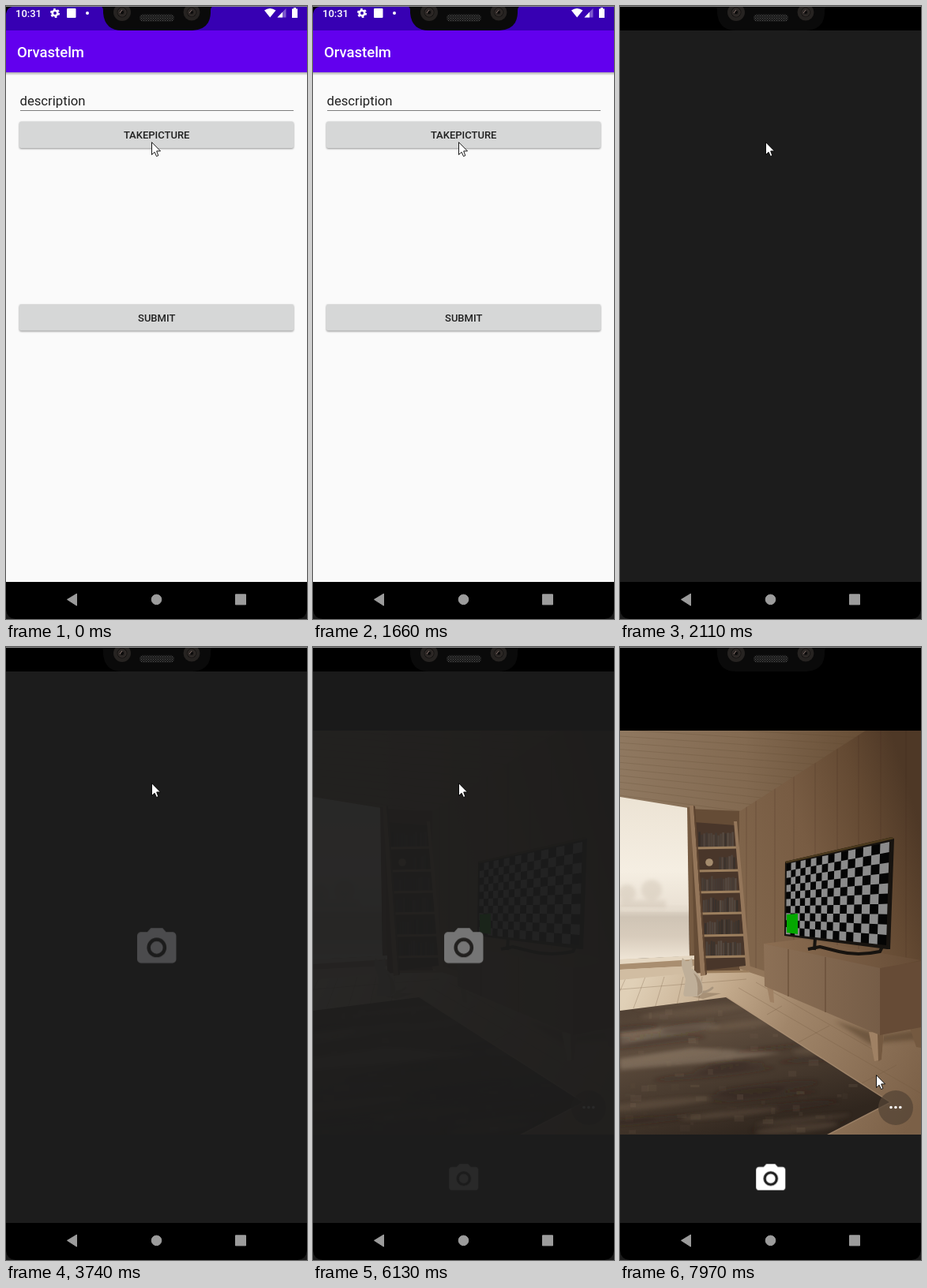
Animation of 381x777 px, one loop 8 s. Source, as an HTML page:

```html
<!DOCTYPE html>
<html lang="en">
<head>
<meta charset="utf-8">
<title>Camera app</title>
<style>
html, body { margin: 0; width: 100%; height: 100%; overflow: hidden; background: #000; }
svg { display: block; width: 381px; height: 777px; font-family: Roboto, "Liberation Sans", sans-serif; }
.medium { font-weight: 500; }
.mid { text-anchor: middle; font-size: 13px; font-weight: 500; fill: #202020; }
.button { filter: drop-shadow(0 1px 1px rgba(0,0,0,.42)); }
.step { animation: 8s step-end infinite; }

#app { animation-name: app; }
#slide, #status { animation-name: opening; }
#take { animation-name: lift; }
#ripple { animation-name: ripple; }
#seam { animation-name: seam; }
#splash { animation-name: splash; }
#preview { animation-name: preview; }
#cursor { animation-name: cursor; }

@keyframes app { 0% { opacity: 1 } 22.625%, 100% { opacity: 0 } }
@keyframes opening { 0% { opacity: 1 } 24.5%, 100% { opacity: 0 } }
@keyframes seam { 0% { opacity: 1 } 26.375%, 100% { opacity: 0 } }
@keyframes lift {
  0%, 18.875%, 100% { filter: drop-shadow(0 1px 1px rgba(0,0,0,.42)) }
  13.625% { filter: drop-shadow(0 2px 2px rgba(0,0,0,.5)) }
}
@keyframes ripple {
  0%, 18.875%, 100% { opacity: 0 }
  13.625% { opacity: .06 }
  15.375% { opacity: .12 }
}
@keyframes splash {
  0%, 78.125%, 100% { opacity: 0; fill: #4b4b4d }
  46.75% { opacity: 1; fill: #4b4b4d }
  58.125% { opacity: 1; fill: #757575 }
}
@keyframes preview {
  0% { opacity: 0 }
  76.625% { opacity: .06 }
  78.125%, 100% { opacity: 1 }
}
@keyframes cursor {
  0% { transform: translate(184px, 172px) }
  86.125% { transform: translate(199px, 212px) }
  87.625% { transform: translate(236px, 318px) }
  89.125% { transform: translate(275px, 440px) }
  90.625% { transform: translate(299px, 528px) }
  92.125% { transform: translate(310px, 557px) }
  94% { transform: translate(320px, 557px) }
  95.875% { transform: translate(324px, 557px) }
  97.75% { transform: translate(327px, 557px) }
  99.625%, 100% { transform: translate(324px, 542px) }
}
</style>
</head>
<body>
<svg viewBox="0 0 381 777">
  <defs>
    <linearGradient id="ceiling"><stop stop-color="#8f7860"/><stop offset=".5" stop-color="#836a51"/><stop offset="1" stop-color="#664d35"/></linearGradient>
    <linearGradient id="wall" gradientUnits="userSpaceOnUse" x1="150" y1="300" x2="381" y2="230">
      <stop stop-color="#80654b"/><stop offset=".4" stop-color="#785c43"/><stop offset=".75" stop-color="#634932"/><stop offset="1" stop-color="#4e3826"/>
    </linearGradient>
    <linearGradient id="view" x2="0" y2="1">
      <stop stop-color="#ece3d4"/><stop offset=".45" stop-color="#f5eee2"/><stop offset=".66" stop-color="#ebe2d5"/>
      <stop offset=".74" stop-color="#cfc4b5"/><stop offset=".86" stop-color="#d8ccbc"/><stop offset="1" stop-color="#efe5d6"/>
    </linearGradient>
    <linearGradient id="floor" gradientUnits="userSpaceOnUse" x1="20" y1="420" x2="370" y2="600">
      <stop stop-color="#e0d0b7"/><stop offset=".28" stop-color="#c2a98b"/><stop offset=".5" stop-color="#a1866a"/><stop offset="1" stop-color="#7b6047"/>
    </linearGradient>
    <linearGradient id="rugTone" x2=".5" y2="1"><stop stop-color="#4c3d31"/><stop offset=".35" stop-color="#5d4c3d"/><stop offset="1" stop-color="#30261e"/></linearGradient>
    <linearGradient id="front"><stop stop-color="#8c7056"/><stop offset="1" stop-color="#765d47"/></linearGradient>
    <linearGradient id="top"><stop stop-color="#8c6e52"/><stop offset="1" stop-color="#664c36"/></linearGradient>
    <linearGradient id="barShade" x2="0" y2="1"><stop stop-color="#000" stop-opacity=".32"/><stop offset="1" stop-color="#000" stop-opacity="0"/></linearGradient>
    <clipPath id="photo"><path d="M0 106H381V618H0z"/></clipPath>
    <clipPath id="rugShape"><path d="M0 461 134 444 341 577 262 618H0z"/></clipPath>
    <clipPath id="barClip"><path d="M0 31H381V55H0z"/></clipPath>
    <filter id="soft"><feGaussianBlur stdDeviation="2.5"/></filter>
    <pattern id="mesh" width="3" height="3" patternUnits="userSpaceOnUse"><path d="M0 0h1v1H0zM1.5 1.5h1v1h-1z" fill="#4e4e4e"/></pattern>
    <path id="camera" d="M9 2 7.170 4H4c-1.100 0-2 .900-2 2v12c0 1.100.900 2 2 2h16c1.100 0 2-.900 2-2V6c0-1.100-.900-2-2-2h-3.170L15 2zm3 15a5 5 0 1 1 0-10 5 5 0 0 1 0 10zm0-1.800a3.200 3.200 0 1 0 0-6.400 3.200 3.200 0 0 0 0 6.400z"/>
    <g id="lens"><circle r="11" fill="#262321"/><circle r="6.500" fill="#151312"/><circle r="5" fill="#292523" stroke="#37312e"/><circle r="2.200" fill="#0c0b0b"/><path d="M-3 1 0-3" stroke="#8d7770"/></g>
  </defs>

  <!-- camera screen -->
  <path fill="#000" d="M0 0H381V777H0z"/>
  <path fill="#1c1c1c" d="M0 31H381V730H0z"/>
  <path id="seam" class="step" fill="#141414" d="M0 31H381V33H0z"/>

  <g id="preview" class="step">
    <path d="M0 31H381V106H0z"/>
    <g clip-path="url(#photo)">
      <path fill="url(#floor)" d="M0 395H381V618H0z"/>
      <path id="planks" fill="none" stroke="#6d5239" stroke-opacity=".28"/>
      <path fill="#654c36" d="M84 198 152 206V410L90 414z"/>
      <path fill="url(#wall)" d="M151 207 310 106H381V440L181 417 151 406z"/>
      <path id="panels" fill="none" stroke="#3b2819" stroke-opacity=".24"/>
      <path fill="#92765a" d="M151 400 184 411V419L151 408z"/>
      <path fill="url(#ceiling)" d="M0 106H311L152 208 86 205 0 191z"/>
      <path id="boards" fill="none" stroke="#57412c" stroke-opacity=".2"/>
      <!-- window -->
      <path fill="url(#view)" d="M0 190 86 204 88 392 0 396z"/>
      <g filter="url(#soft)" fill="#cfc3b3" opacity=".45">
        <circle cx="9" cy="312" r="11"/><circle cx="40" cy="308" r="13"/><path d="M0 321H58V333H0z"/>
      </g>
      <path fill="#f4ecdf" d="M0 330 87 332V335L0 334z" opacity=".6" filter="url(#soft)"/>
      <path fill="#755a41" d="M85 203 90 203 94 394 88 394z"/>
      <path fill="#e4d6c1" d="M0 396 94 391V396L0 402z"/>
      <path fill="#a98e70" d="M0 402 94 396V404L0 409z"/>
      <path fill="#d1bda2" d="M0 409 94 404V413L0 422z"/>
      <!-- ladder shelf -->
      <path fill="#49362a" d="M94 222 146 226 159 404 107 410z"/>
      <g id="books"></g>
      <circle cx="113" cy="273" r="4.800" fill="#a58c6e"/>
      <path id="shelves" fill="none" stroke="#9c7f5e" stroke-width="3"/>
      <path fill="#94765a" d="M88 201 93 201 108 416 102 417zM144 221 148 221 165 409 160 411z"/>
      <path fill="#5d4430" d="M93 201 95 202 110 415 108 416z"/>
      <!-- cat -->
      <path fill="#5b4733" opacity=".3" d="M82 441 105 438 128 439 105 446z"/>
      <path d="M102 437Q111 438 117 432" fill="none" stroke="#a8957e" stroke-width="3" stroke-linecap="round"/>
      <path fill="#bfaf99" d="M79 394 83 398H87L91 394 92 404 90 407C98 411 105 422 105 434Q105 442 97 443H83Q79 443 81 435L83 421 79 408Q77 401 79 394z"/>
      <path fill="#958069" d="M93 413Q106 423 104 438L98 442Q100 424 93 413z" opacity=".65"/>
      <!-- rug -->
      <path d="M134 444 341 577 262 618" fill="none" stroke="#b0967a" stroke-opacity=".45" stroke-width="3"/>
      <g clip-path="url(#rugShape)">
        <path fill="url(#rugTone)" d="M0 440H345V618H0z"/>
        <g filter="url(#soft)" fill="#9c8a76">
          <path d="M0 488 112 476 128 481 50 495 0 505z" opacity=".6"/>
          <path d="M0 522 90 508 205 514 130 525 0 536z" opacity=".5"/>
        </g>
        <g id="rug"></g>
      </g>
      <!-- cabinet -->
      <path fill="#553f2b" opacity=".55" d="M272 474 330 492 381 485V497L316 503z" filter="url(#soft)"/>
      <path fill="#9f8164" d="M186 430 194 433 195 451 190 450zM315 488 334 489 331 523 322 525z"/>
      <path fill="#745940" d="M326 491 334 489 331 523 327 525zM367 483 381 480V508L375 507z"/>
      <path fill="url(#top)" d="M182 376 230 370 381 397 329 408z"/>
      <path fill="url(#front)" d="M182 376 329 407V492L183 430z"/>
      <path fill="#664b36" d="M329 407 381 398V482L329 492z"/>
      <path d="M213 383V443M260 393V463" stroke="#604731" fill="none"/>
      <!-- television -->
      <path d="M247 369 246 384M238 383 253 380 277 386Q301 392 329 386L332 380" stroke="#17130f" stroke-width="4" fill="none" stroke-linejoin="round"/>
      <path fill="#17130f" d="M209 272 344 241 347 243 342 383 338 383 208 366z"/>
      <path fill="#4c3a1d" d="M209 272 344 241 347 243 343 244 210 274z"/>
      <path fill="#050505" d="M211 275 341 247 337 378 210 364z"/>
      <path id="checks" fill="#8b8b8b"/>
      <path fill="#04a800" d="M211 339 225 338V364L211 362z"/>
      <circle cx="349" cy="584" r="22" fill="#544436" opacity=".75"/>
    </g>
    <path d="M343 583.500h.010m5.900 0h.010m5.900 0h.010" stroke="#fff" stroke-width="3.600" stroke-linecap="round"/>
    <use href="#camera" transform="translate(168.500 651.600) scale(1.854)" fill="#fff"/>
  </g>
  <g id="splash" class="step"><use href="#camera" transform="translate(161.100 351.300) scale(2.472)"/></g>

  <!-- form sliding away -->
  <g id="slide" class="step">
    <path fill="#1c1c1c" d="M0 55H381V730H0z"/>
    <path fill="#1b0055" d="M0 1H381V31H0z"/>
    <path fill="#260063" d="M0 21H381V31H0z"/>
    <path fill="#5a00d6" d="M0 31H381V55H0z"/>
    <text x="14" y="54.500" font-size="18.500" class="medium" fill="#eadcf8" clip-path="url(#barClip)">Orvastelm</text>
  </g>

  <!-- form -->
  <g id="app" class="step">
    <path fill="#fafafa" d="M0 84H381V730H0z"/>
    <path fill="#3700b3" d="M0 1H381V31H0z"/>
    <path fill="#6200ee" d="M0 31H381V84H0z"/>
    <path fill="url(#barShade)" d="M0 84H381V88H0z"/>
    <text x="14" y="65" font-size="18.500" class="medium" fill="#fff">Orvastelm</text>
    <text x="17.500" y="126" font-size="16.700" fill="#212121">description</text>
    <path fill="#7d7d7d" d="M18 132H364V133H18z"/>
    <g id="take" class="step button"><rect x="17" y="146.500" width="347" height="33.500" rx="2" fill="#d6d7d7"/></g>
    <rect id="ripple" class="step" x="17" y="146.500" width="347" height="33.500" rx="2"/>
    <text x="190.700" y="168" class="mid">TAKEPICTURE</text>
    <g class="button"><rect x="17" y="378" width="347" height="33.500" rx="2" fill="#d6d7d7"/></g>
    <text x="190.700" y="399.500" class="mid">SUBMIT</text>
  </g>

  <g id="status" class="step" fill="#fff">
    <text x="12" y="14" font-size="13" class="medium">10:31</text>
    <circle cx="62" cy="9" r="3.300" fill="none" stroke="#fff" stroke-width="2.600"/>
    <circle cx="62" cy="9" r="5.100" fill="none" stroke="#fff" stroke-width="2" stroke-dasharray="2.670"/>
    <rect x="77" y="3" width="11.500" height="12" rx="1"/>
    <circle cx="103" cy="9" r="2"/>
    <path d="M327 5.500Q334 .500 341.500 5.500L334.200 14.500z"/>
    <path opacity=".35" d="M354.500 3V14.500H343.500z"/><path d="M350 7.700V14.500H343.500z"/>
    <path d="M364 2H367V3.500H369V15H362V3.500H364z"/>
  </g>

  <!-- phone -->
  <path fill="#0a0a0a" d="M121 1Q123 2 123 6V9Q125 31 147 31H236Q258 30 259 9V6Q259 2 261 1z"/>
  <use href="#lens" x="147" y="8"/>
  <use href="#lens" transform="translate(235 8) scale(.950)"/>
  <rect x="169" y="10.500" width="44" height="9" rx="4.500" fill="#171717"/>
  <rect x="169" y="10.500" width="44" height="9" rx="4.500" fill="url(#mesh)"/>
  <path d="M0 1H8Q1 2 0 10z"/>
  <path fill="#8e8e8e" d="M0 0H381V1H0z"/>
  <path d="M0 730H381V777H0z"/>
  <path fill="#1a1a1a" d="M0 765Q1 776 12 777H0zM381 765Q380 776 369 777H381z"/>
  <g fill="#9c9c9c" stroke="#9c9c9c" stroke-linejoin="round">
    <path d="M77.500 752.300 89.500 745V760z"/>
    <circle cx="190.500" cy="752.300" r="6.300"/>
    <path d="M290.500 745.800H303.500V758.800H290.500z"/>
  </g>
  <g id="cursor" class="step">
    <path d="M.500.700V16.500L4.100 13.200 6.500 18.500 8.800 17.600 6.700 11.900H11.500z" fill="#fff" stroke="#000" stroke-width=".900"/>
  </g>
</svg>
<script>
const get = id => document.getElementById(id);
const draw = (id, d) => get(id).setAttribute("d", d);
const mix = (a, b, t) => a + (b - a) * t;
const times = (n, f) => Array.from({ length: n }, (_, i) => f(i)).join("");

let seed = 7;
const random = () => (seed = seed * 16807 % 2147483647) / 2147483647;

// Ceiling boards meet the slanted wall edge.
draw("boards", times(12, i => {
  const t = i / 12;
  return `M0 ${mix(188, 88, t)}L${mix(152, 311, t)} ${mix(208, 106, t)}`;
}));

draw("panels", [160, 172, 196, 220, 247, 275, 302, 330, 362].map(x =>
  `M${x} ${Math.max(106, 207 - (x - 151) * .635)}V${405 + (x - 151) * .15}`).join(""));

// Short boards by the window, long ones beside the rug.
draw("planks",
  times(5, i => `M${i * 24 + 8} 418L${i * 27 - 10} 458`) +
  "M0 434 160 421M150 432 381 566M172 425 325 513M205 455 186 466M265 480 226 501M350 530 306 553");

// The shelf widens slightly toward the floor.
const rowY = [254, 283, 310, 337, 365, 392];
const left = y => 91 + (y - 201) * .068, right = y => 147 + (y - 221) * .087;
draw("shelves", [...rowY, 411].map(y => `M${left(y)} ${y + 1}L${right(y)} ${y}`).join(""));
get("books").innerHTML = rowY.map(y => times(15, i => {
  const x = left(y) + 6 + i * 3;
  if (y === 283 && i < 8) return "";
  const c = 55 + random() * 32;
  return `<path d="M${x} ${y - 1}v${-14 - random() * 5}" stroke="rgb(${c},${c * .86},${c * .76})" stroke-width="2.5"/>`;
})).join("");

get("rug").innerHTML =
  `<g filter="url(#soft)">${times(30, () => {
    const x = random() * 300 - 30, y = 452 + random() * 160;
    const fill = random() < .5 ? "#806d59" : "#2c221a";
    return `<ellipse cx="${x}" cy="${y}" rx="${25 + random() * 55}" ry="${2 + random() * 4}" fill="${fill}" opacity=".28" transform="rotate(-6 ${x} ${y})"/>`;
  })}</g>` +
  times(70, () => `<rect x="${random() * 290}" y="${455 + random() * 160}" width="${4 + random() * 10}" height="${3 + random() * 6}" fill="#8b7762" opacity="${random() * .18}"/>`);

// Checkerboard on a plane seen at an angle.
const cols = 16, rows = 10;
const onScreen = (i, j) => {
  const u = i / cols, v = j / rows;
  const t = u * 89 / mix(131, 89, u);
  const top = mix(275, 247, t), bottom = mix(364, 378, t);
  return `${mix(mix(211, 341, t), mix(210, 337, t), v).toFixed(1)} ${mix(top, bottom, v).toFixed(1)}`;
};
draw("checks", times(cols * rows, k => {
  const i = k % cols, j = Math.floor(k / cols);
  return (i + j) % 2 ? `M${onScreen(i, j)}L${onScreen(i + 1, j)} ${onScreen(i + 1, j + 1)} ${onScreen(i, j + 1)}z` : "";
}));
</script>
</body>
</html>
```
